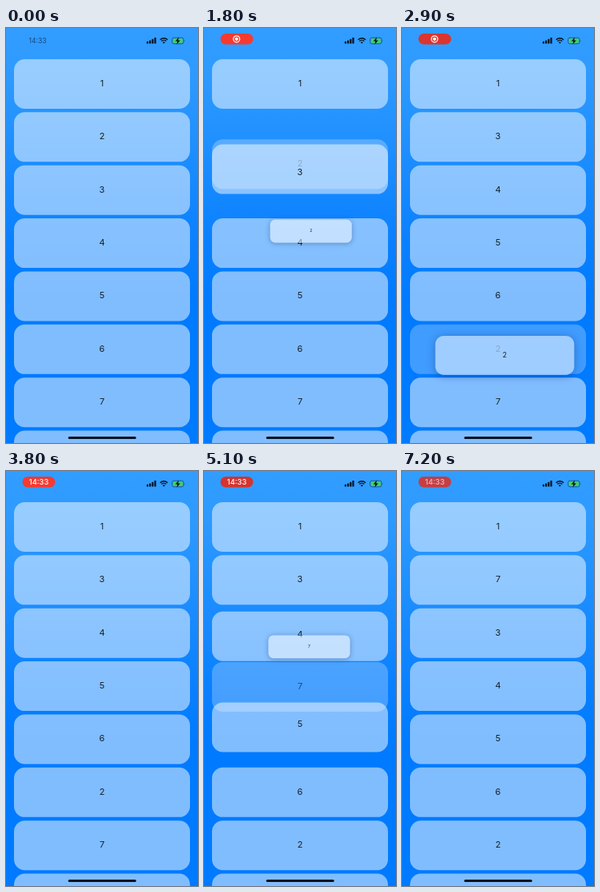
An HTML page for the animation above (7.3 s loop, 240 px wide and 519 px high).

```html
<!DOCTYPE html>
<html lang="en">
<head>
<meta charset="utf-8">
<title>Reorderable list</title>
<style>
  html, body { margin: 0; width: 100%; height: 100%; overflow: hidden; }
  body {
    position: relative;
    background: linear-gradient(#329dff 0, #2e9aff 60px, #0b81ff 260px, #007aff 340px);
    font: 400 11px/61.5px Inter, "Liberation Sans", sans-serif;
    color: #16202c;
  }
  .card {
    position: absolute; left: 10px; top: 0; width: 220px; height: 61.5px;
    border-radius: 13.5px; background: rgba(255, 255, 255, .5); text-align: center;
  }
  .card span { display: block; }
  #preview { box-shadow: 0 2px 14px rgba(0, 25, 80, .34); }
  svg { position: absolute; left: 0; top: 0; }
</style>
</head>
<body>
<div id="list"></div>
<div id="preview" class="card"><span></span></div>
<svg width="240" height="519" viewBox="0 0 240 519">
  <text id="clock" x="39.5" y="19" font-size="8.6" fill="#17477f" text-anchor="middle" style="line-height:1">14:33</text>
  <g id="pill">
    <rect id="pillBg" x="20.5" y="7" width="41" height="13.4" rx="6.7"/>
    <g id="rec">
      <circle cx="40.7" cy="13.8" r="4" fill="none" stroke="#fff" stroke-width="1.2"/>
      <circle cx="40.7" cy="13.8" r="2.1" fill="#fff"/>
    </g>
    <text id="pillTime" x="41" y="17.1" font-size="9.3" font-weight="500" fill="#fff" text-anchor="middle">14:33</text>
  </g>
  <g fill="#06121f">
    <rect x="175.8" y="16.8" width="2.2" height="2.7" rx=".6"/>
    <rect x="179" y="15.5" width="2.2" height="4" rx=".6"/>
    <rect x="182.2" y="13.8" width="2.2" height="5.7" rx=".6"/>
    <rect x="185.4" y="12" width="2.2" height="7.5" rx=".6"/>
    <path d="M197.3 19.6l-1.6-1.7a2.3 2.3 0 0 1 3.2 0z"/>
    <g fill="none" stroke="#06121f" stroke-width="1.3">
      <path d="M194.3 16.5a4.3 4.3 0 0 1 6 0"/>
      <path d="M192.6 14.7a6.7 6.7 0 0 1 9.4 0"/>
    </g>
    <rect x="207.6" y="12.2" width="14.4" height="7.6" rx="2.3" fill="none" stroke="#1c4a72" stroke-width=".8"/>
    <rect x="208.7" y="13.3" width="12.2" height="5.4" rx="1.3" fill="#3ed267"/>
    <path d="M222.8 14.7q1.2 1.3 0 2.6z" fill="#1c4a72"/>
    <path d="M216 11.6l-4.3 5h2.5l-.8 4 4.4-5.1h-2.6z"/>
    <rect x="77.7" y="511" width="85" height="3" rx="1.5"/>
  </g>
</svg>
<script>
const LOOP = 7300, TICK = 100, TOP = 39, STEP = 66.37, HALF = 30.75;
const MOVE = 350, TEXT_LAG = 15, LEAD = 26, SMALL = .464, LIFTED = 1.05;

// swaps: [time, card pushed aside]; path: [time, x, y] of the preview centre
const drags = [
  { id: 2, dir: 1, lift: 900, start: 1300, drop: 2700,
    swaps: [[1650, 3], [1810, 4], [1963, 5], [2214, 6]],
    path: [[1300, 120, 136.1], [1500, 124, 155], [1650, 129, 192], [1810, 134, 258],
           [1963, 137, 324], [2150, 140, 392], [2300, 141.3, 419], [2700, 141.5, 421], [3050, 120, 401.6]] },
  { id: 7, dir: -1, lift: 3900, start: 4250, drop: 6000,
    swaps: [[4490, 2], [4660, 6], [4858, 5], [5048, 4], [5260, 3]],
    path: [[4250, 120, 468], [4490, 124, 430], [4660, 127, 364], [4858, 129, 299],
           [5048, 131, 236], [5100, 131.5, 219.7], [5260, 136, 170], [5480, 142, 140],
           [5700, 144.5, 135.5], [6000, 144.5, 135], [6350, 120, 136.1]] }
];

const $ = id => document.getElementById(id);
const clamp = p => Math.max(0, Math.min(1, p));
const ramp = (t, from, len) => clamp((t - from) / len);
const ease = p => p * p * (3 - 2 * p);
const mix = (a, b, p) => a + (b - a) * p;

const cards = Array.from({ length: 8 }, (_, i) => {
  const box = document.createElement("div"), label = document.createElement("span");
  box.className = "card";
  label.textContent = i + 1;
  box.append(label);
  $("list").append(box);
  return { id: i + 1, box, label };
});

function slot(id, t) {
  let s = id - 1;
  for (const d of drags)
    for (const [at, other] of d.swaps) {
      if (id === d.id) s += d.dir * ease(ramp(t, at - LEAD, MOVE));
      else if (id === other) s -= d.dir * ease(ramp(t, at, MOVE));
    }
  return s;
}

function along(path, t) {
  if (t <= path[0][0]) return path[0].slice(1);
  for (let i = 1; i < path.length; i++) {
    const [t0, x0, y0] = path[i - 1], [t1, x1, y1] = path[i];
    if (t <= t1) {
      let p = (t - t0) / (t1 - t0);
      if (i === path.length - 1) p = ease(p);
      return [mix(x0, x1, p), mix(y0, y1, p)];
    }
  }
  return path[path.length - 1].slice(1);
}

function drawCards(t) {
  for (const { id, box, label } of cards) {
    const y = TOP + STEP * slot(id, t), drag = drags.find(d => d.id === id);
    box.style.transform = `translateY(${y}px)`;
    if (drag) {
      const dim = ramp(t, drag.start, 200) - ramp(t, drag.drop + MOVE, 100);
      box.style.opacity = 1 - .5 * dim;
    } else {
      label.style.transform = `translateY(${STEP * (slot(id, t - TEXT_LAG) - slot(id, t))}px)`;
    }
  }
}

function drawPreview(t) {
  const d = drags.find(d => t > d.lift && t < d.drop + MOVE + 100), el = $("preview");
  el.style.display = d ? "" : "none";
  if (!d) return;
  let scale = mix(1, LIFTED, ease(ramp(t, d.lift, 320)));
  scale = mix(scale, SMALL, ease(ramp(t, d.start, 250)));
  scale = mix(scale, 1, ease(ramp(t, d.drop, MOVE)));
  const [x, y] = along(d.path, t);
  el.firstChild.textContent = d.id;
  el.style.opacity = ramp(t, d.lift, 100) - ramp(t, d.drop + MOVE, 100);
  el.style.transform = `translate(${x - 120}px, ${y - HALF}px) scale(${scale})`;
}

function drawStatus(t) {
  const on = ramp(t, 100, 300), dark = (1 + Math.cos((t - 1100) / 1000 * Math.PI)) / 2;
  const toTime = ramp(t, 3000, 300), fade = ramp(t, 7000, 300);
  $("clock").style.opacity = 1 - on;
  $("pill").style.opacity = on * (1 - .15 * fade);
  $("pillBg").style.fill = `rgb(${mix(255, 214, dark)}, ${mix(59, 52, dark)}, ${mix(48, 46, dark)})`;
  $("rec").style.opacity = 1 - toTime;
  $("pillTime").style.opacity = toTime * (1 - .45 * fade);
}

const begin = performance.now();
function frame() {
  const t = Math.floor((performance.now() - begin) % LOOP / TICK) * TICK;
  drawCards(t);
  drawPreview(t);
  drawStatus(t);
  requestAnimationFrame(frame);
}
frame();
</script>
</body>
</html>
```
